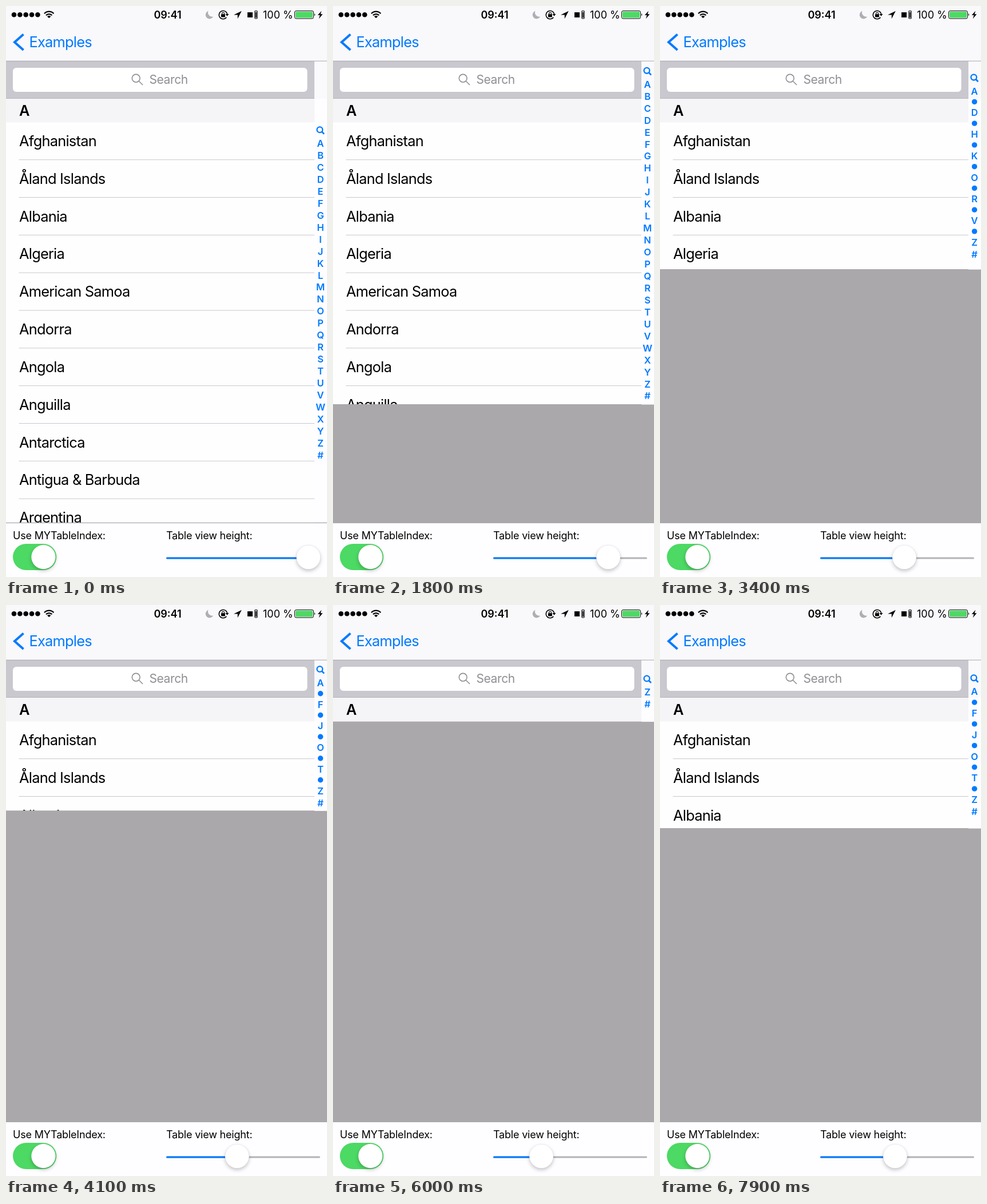
These frames come from a looping animation (561x998 px, 8000 ms). An HTML page:

```html
<!DOCTYPE html>
<html lang="en">
<head>
<meta charset="utf-8">
<title>Table index</title>
<style>
  html, body { margin: 0; width: 100%; height: 100%; overflow: hidden; background: #fefdff; }
  svg { display: block; width: 561px; height: 998px; font-family: Inter, Roboto, sans-serif; }
  .row { font-size: 25.4px; letter-spacing: -.76px; }
  .small { font-size: 18px; letter-spacing: -.2px; }
  .status { font-size: 18px; }
  .bold { font-weight: 600; }
  .blue { fill: #007aff; }
  .line { fill: none; stroke: #000; stroke-width: 1.5; }
  .knob { fill: #fff; stroke: rgba(0,0,0,.09); stroke-width: .7; filter: drop-shadow(0 3px 3px rgba(0,0,0,.22)); }
  #index { font-size: 16.5px; font-weight: 600; text-anchor: middle; fill: #007aff; }
</style>
</head>
<body>
<svg viewBox="0 0 561 998">
  <defs><clipPath id="clip"><rect id="clipBox" y="90" width="561"/></clipPath></defs>
  <rect width="561" height="998" fill="#fefdff"/>
  <rect y="96" width="561" height="808" fill="#aaa8ab"/>

  <g clip-path="url(#clip)">
    <rect y="96" width="539" height="808" fill="#fffeff"/>
    <g id="rows"></g>
    <rect y="96" width="539" height="66" fill="#c9c8cf"/>
    <rect y="161" width="539" height="1" fill="#b6b5ba"/>
    <rect x="12" y="108" width="514.5" height="42" rx="6" fill="#fff"/>
    <g fill="none" stroke="#8e8e93" stroke-width="1.6">
      <circle cx="227.2" cy="126.3" r="6.9"/><path d="M232.2 131.3L239 138"/>
    </g>
    <text x="250.5" y="136" font-size="21" letter-spacing="-.4" fill="#8e8e93">Search</text>
    <rect y="162" width="539" height="41.5" fill="#f5f4f7"/>
    <text class="row bold" x="23" y="192">A</text>
  </g>
  <rect id="panel" x="539" y="96" width="22" fill="#fefdff"/>
  <rect x="539" y="96" width="22" height="66" fill="#faf9fc"/>
  <g id="index"></g>

  <rect width="561" height="96" fill="#f9f8fb"/>
  <rect y="95.7" width="561" height="1" fill="#a9a8ac"/>
  <path d="M30.5 49.5L15 63.3L30.5 77" fill="none" stroke="#007aff" stroke-width="4"/>
  <text class="row blue" x="40.5" y="72">Examples</text>

  <g id="signal"></g>
  <g class="line" stroke-width="2.2">
    <path d="M67 13.2a11.4 11.4 0 0 1 16.4 0M70 16.3a7.2 7.2 0 0 1 10.4 0" stroke-width="2.2"/>
    <path d="M75.2 21.2L72 18.2a4.6 4.6 0 0 1 6.4 0z" fill="#000" stroke="none"/>
  </g>
  <text class="status bold" x="282.5" y="21.5" text-anchor="middle">09:41</text>
  <path d="M353.5 8.8a7 7 0 1 0 8.6 9.6a7.2 7.2 0 0 1-8.6-9.6z" fill="#b0aeb2"/>
  <path class="line" d="M385.3 19.8a7.2 7.2 0 1 1 1.4-4.3"/>
  <path d="M383.5 14h6l-3 3.8z"/>
  <rect x="376" y="14.2" width="7" height="5.2" rx=".6"/>
  <path class="line" d="M377.6 14.5v-1.6a1.9 1.9 0 0 1 3.8 0v1.6" style="stroke-width:1.2"/>
  <path d="M411.8 8.8L398 15.5h6.8v6.8z"/>
  <rect x="422" y="11" width="9" height="9"/>
  <rect class="line" x="434.7" y="8.5" width="4.6" height="13.5" rx="1.2" style="stroke-width:1.1"/>
  <rect x="436" y="10.5" width="2" height="10"/>
  <text class="status" x="449" y="21.5">100 %</text>
  <rect class="line" x="504.5" y="8.5" width="33" height="13.5" rx="2.5" style="stroke-width:1"/>
  <rect x="506" y="10" width="30" height="10.5" rx="1" fill="#4cd964"/>
  <path d="M539 13q2.4 2.2 0 4.4z"/>
  <path d="M551.5 8.5L544.8 16h3.8l-1.8 6.2l6.7-8h-3.8z"/>

  <rect y="904" width="561" height="94" fill="#fefdff"/>
  <text class="small" x="12" y="931.5">Use MYTableIndex:</text>
  <rect x="12" y="940" width="76.3" height="46" rx="23" fill="#4cd964"/>
  <circle class="knob" cx="65.4" cy="963" r="21.2"/>
  <text class="small" x="280" y="931.5">Table view height:</text>
  <rect x="280" y="963.5" width="269" height="3" rx="1.5" fill="#b4b3b6"/>
  <rect class="blue" id="track" x="280" y="963.5" height="3" rx="1.5"/>
  <circle class="knob" id="thumb" cy="963.5" r="21"/>
</svg>
<script>
const $ = id => document.getElementById(id);
const set = (id, attrs) => Object.entries(attrs).forEach(([k, v]) => $(id).setAttribute(k, v));

const LOOP = 8000, STEP = 100;
const TOP = 96, FULL = 902.7, MIN = 203.5;
const LETTER = 20.95, PAIR = 37.75, FIRST = 23, EDGE = 27;
const ALPHABET = [...'ABCDEFGHIJKLMNOPQRSTUVWXYZ'];

// [time, table bottom requested by the slider]
const KEYS = [[0, FULL], [600, FULL], [1800, 696], [3400, 460], [4700, 273],
  [5500, 186], [6000, 186], [7200, 311], [7900, 390], [LOOP, 401]];

const COUNTRIES = ['Afghanistan', 'Åland Islands', 'Albania', 'Algeria', 'American Samoa',
  'Andorra', 'Angola', 'Anguilla', 'Antarctica', 'Antigua &amp; Barbuda', 'Argentina'];

$('rows').innerHTML = COUNTRIES.map((name, i) => {
  const y = i * 65.83;
  return `<text class="row" x="23" y="${245 + y}">${name}</text>
    <rect x="22.5" y="${268.2 + y}" width="516.5" height="1" fill="#c8c7cc"/>`;
}).join('');

$('signal').innerHTML = [0, 1, 2, 3, 4]
  .map(i => `<circle cx="${14 + i * 10.35}" cy="15.3" r="4.3"/>`).join('');

function valueAt(t) {
  const i = KEYS.findIndex(([time]) => time > t);
  const [t0, a] = KEYS[i - 1], [t1, b] = KEYS[i];
  return a + (b - a) * (t - t0) / (t1 - t0);
}

const label = (text, y) => `<text x="549.6" y="${y + 6}">${text}</text>`;

// Letters that fit in the given height, with dots for the skipped ones
function indexLayout(space) {
  const full = FIRST + 26 * LETTER;
  const complete = full + EDGE <= space;
  const count = complete ? 26
    : Math.max(1, Math.floor((space - EDGE - FIRST - LETTER) / PAIR) + 1);
  const pitch = complete ? LETTER : PAIR;
  let items = `<circle cx="548.4" cy="-.9" r="4.9" fill="none" stroke="#007aff" stroke-width="2.3"/>
    <path d="M551.6 2.3L556 6.7" stroke="#007aff" stroke-width="2.7"/>`;
  let y = FIRST;
  for (let k = 0; k < count; k++, y += pitch) {
    const last = k === count - 1;
    const pick = complete ? k : last ? 25 : Math.round(52 * k / (2 * count - 1));
    items += label(ALPHABET[pick], y);
    if (!complete && !last) items += `<circle cx="549.6" cy="${y + PAIR / 2}" r="4.7"/>`;
  }
  y += LETTER - pitch;
  items += label('#', y);
  return { count, items, span: y };
}

let shownCount = 0;

function draw(now) {
  const t = Math.floor(now % LOOP / STEP) * STEP;
  const wanted = valueAt(t);
  const bottom = Math.max(MIN, wanted);
  const x = 528.5 - (FULL - wanted) / 4.36;

  set('clipBox', { height: bottom - 90 });
  set('panel', { height: bottom + (bottom < FULL ? .6 : 0) - TOP });
  set('track', { width: x - 280 });
  set('thumb', { cx: x });

  const layout = indexLayout(bottom - TOP);
  if (layout.count !== shownCount) {
    $('index').innerHTML = layout.items;
    shownCount = layout.count;
  }
  const start = (TOP + bottom - layout.span) / 2 + 1.6;
  set('index', { transform: `translate(0 ${start})` });
}

const begin = performance.now();
function tick() {
  draw(performance.now() - begin);
  requestAnimationFrame(tick);
}
tick();
</script>
</body>
</html>
```
